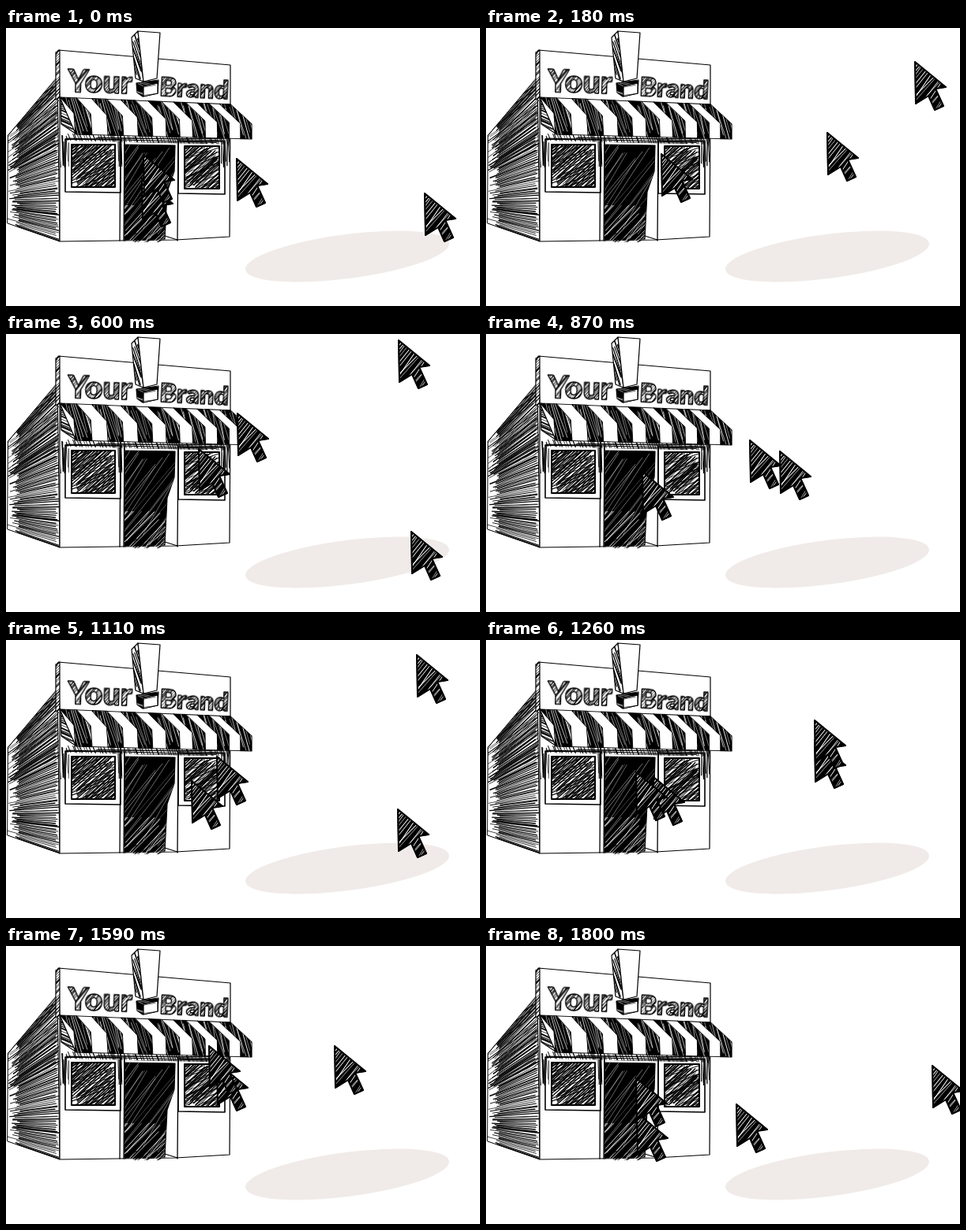
An HTML page with a canvas for the animation above (1830 ms loop, 600x353 px).

```html
<!DOCTYPE html>
<html lang="en">
<head>
<meta charset="utf-8">
<title>Storefront visitors</title>
<style>
html, body { margin: 0; width: 100%; height: 100%; overflow: hidden; background: #fff; }
canvas { display: block; }
</style>
</head>
<body>
<canvas id="stage" width="600" height="353"></canvas>
<script>
const STEP = 30, STEPS = 61, CYCLE = 62;
const stage = document.getElementById('stage').getContext('2d');
let seed = 7;
const rnd = () => (seed = (seed * 16807) % 2147483647) / 2147483647;
const jit = a => (rnd() - 0.5) * 2 * a;
const mix = (a, b, u) => a + (b - a) * u;
const box = (x, y, w, h, drop = 0) => [x, y, x + w, y + drop, x + w, y + h + drop, x, y + h];

function layer(w, h) {
  const c = document.createElement('canvas');
  c.width = w;
  c.height = h;
  const g = c.getContext('2d');
  g.lineCap = g.lineJoin = 'round';
  return g;
}

function trace(g, p) {
  g.beginPath();
  for (let i = 0; i < p.length; i += 2) g.lineTo(p[i], p[i + 1]);
}

function line(g, p, width = 1.2) {
  trace(g, p);
  g.lineWidth = width;
  g.stroke();
}

function shape(g, p, fill = '#fff', width = 1.2) {
  trace(g, p);
  g.closePath();
  g.fillStyle = fill;
  g.fill();
  g.lineWidth = width;
  g.stroke();
}

// Uneven pen strokes at one angle, kept inside a polygon
function hatch(g, p, angle, gap, width, color = '#000') {
  const xs = p.filter((v, i) => i % 2 === 0), ys = p.filter((v, i) => i % 2);
  const x0 = Math.min(...xs), x1 = Math.max(...xs), y0 = Math.min(...ys), y1 = Math.max(...ys);
  const r = Math.hypot(x1 - x0, y1 - y0) / 2;
  g.save();
  trace(g, p);
  g.clip();
  g.translate((x0 + x1) / 2, (y0 + y1) / 2);
  g.rotate(angle);
  g.strokeStyle = color;
  for (let y = -r; y < r; y += gap) {
    const a = rnd() * r / 2, b = rnd() * r / 2;
    line(g, [a - r, y + jit(gap), r - b, y + jit(gap)], width * (0.6 + rnd() * 0.8));
  }
  g.restore();
}

function shaded(g, p, fill, angle, gap, width, color) {
  shape(g, p, fill);
  hatch(g, p, angle, gap, width, color);
}

function sideWall(g) {
  shape(g, [2, 137, 65, 62, 68, 271, 2, 248], '#fff', 1);
  for (let u = 0; u <= 1; u += 0.012) {
    const a = rnd() * 0.25, b = 1 - rnd() * 0.08;
    const ya = mix(137, 248, u), yb = mix(62, 271, u);
    line(g, [mix(2, 67, a), mix(ya, yb, a), mix(2, 67, b), mix(ya, yb, b) + jit(1)], 0.7 + rnd() * 0.8);
  }
  hatch(g, [2, 137, 65, 62, 67, 150, 2, 180], -0.6, 3.2, 0.8);
}

// Hollow sketched lettering with hatching inside
function word(g, text, x, y, size, tilt) {
  const t = layer(130, 60);
  t.font = `900 ${size}px Lato, sans-serif`;
  t.fillStyle = '#fff';
  t.fillText(text, 3, 45);
  t.globalCompositeOperation = 'source-atop';
  hatch(t, box(0, 0, 130, 60), -0.9, 1.6, 0.9);
  t.globalCompositeOperation = 'source-over';
  t.lineWidth = 1.4;
  t.strokeText(text, 3, 45);
  g.save();
  g.translate(x, y);
  g.rotate(tilt);
  g.drawImage(t.canvas, -3, -45);
  g.restore();
}

function sign(g) {
  shape(g, [66, 28, 284, 47, 284, 97, 68, 89]);
  shaded(g, box(63, 31, 5, 60, -3), '#fff', -0.8, 2, 0.9);
  word(g, 'Your', 78, 81, 39, 0.03);
  word(g, 'Brand', 194, 86, 32.5, 0.05);
  shaded(g, [167, 4, 159, 12, 164, 64, 174, 68], '#fff', 1.25, 1.7, 1.1);
  shape(g, [167, 4, 195, 6, 191, 64, 174, 68]);
  shaded(g, [165, 70, 193, 66, 192, 83, 173, 87, 166, 82], '#000', 0.3, 5, 0.5, '#fff');
  shaded(g, box(174, 74, 18, 13, -4), '#fff', -0.3, 5, 0.6);
}

function awning(g) {
  shaded(g, [69, 90, 88, 134, 70, 122], '#fff', 0.4, 1.8, 1);
  const edge = (x0, x1, y0, y1) => u => [mix(x0, x1, u), mix(y0, y1, u)];
  const top = edge(69, 284, 88, 97), knee = edge(86, 311, 108, 122), hem = edge(88, 311, 135, 141);
  const recede = a => 1.25 * a / (1 + 0.25 * a);
  for (let i = 0; i < 13; i++) {
    const a = recede(i / 13), b = recede((i + 1) / 13);
    const p = [...top(a), ...top(b), ...knee(b), ...hem(b), ...hem(a), ...knee(a)];
    if (i % 2) shape(g, p, '#fff', 0.9);
    else shaded(g, p, '#000', 1.3, 3.2, 0.6, '#fff');
  }
}

function windowPane(g, x, y, w) {
  const glass = box(x + 8, y + 7, w - 15, 54);
  shape(g, box(x, y, w, 67, 1), '#fff', 1.6);
  shape(g, glass, '#fff', 2);
  hatch(g, glass, -0.75, 1.6, 1.2);
  hatch(g, glass, -0.4, 3, 0.9);
}

function front(g) {
  shape(g, [68, 89, 284, 97, 283, 265, 215, 269, 68, 271]);
  windowPane(g, 75, 141, 70);
  windowPane(g, 218, 143, 59);
  for (const x of [69, 140, 272]) hatch(g, box(x, 136, 11, 41), 1.54, 1.8, 1);

  const door = [150, 148, 214, 149, 213, 182, 204, 208, 201, 268, 150, 269];
  shape(g, door, '#000');
  hatch(g, door, -0.95, 5, 0.45, '#ccc');
  hatch(g, box(150, 225, 51, 45), -0.8, 4, 0.7, '#fff');
  hatch(g, box(150, 260, 48, 12), -0.5, 3, 0.8);
  for (const x of [144, 149, 217]) line(g, [x + 1, 142, x, 270], 1.3);
  line(g, [201, 264, 217, 269]);
  const shade = box(76, 134, 207, 9, 5);
  hatch(g, shade, 0.02, 2, 1.1);
  hatch(g, shade, 1.2, 3, 0.8);
}

function drawScene() {
  const g = layer(600, 353);
  g.fillStyle = '#fff';
  g.fillRect(0, 0, 600, 353);
  // flat disc on the ground
  g.fillStyle = '#f0ebe8';
  g.beginPath();
  g.ellipse(432, 290, 130, 28, -0.13, 0, 7);
  g.fill();
  sideWall(g);
  front(g);
  sign(g);
  awning(g);
  return g.canvas;
}

function drawArrow() {
  const g = layer(48, 68);
  g.translate(2, 2);
  const p = [0, 0, 39, 32, 26, 34, 36, 56, 25, 61, 17, 43, 1, 53];
  shape(g, p, '#000', 1.6);
  hatch(g, p, -0.9, 3.6, 0.8, '#fff');
  trace(g, p);
  g.closePath();
  g.lineWidth = 2;
  g.stroke();
  return g.canvas;
}

// Arrows bounce every 12 steps toward the door, losing height each time.
// Each lane: steps at which its arrows pass age 0, x by age, bounce heights, bounce offset.
const BOUNCE = 12, GONE = 27;
const lanes = [
  { times: [1, 20, 36, 47], x: t => 513 - 17 * t + 0.15 * t * t, heights: [144, 108, 72, 36], offset: 12 },
  { times: [8, 20, 38], x: t => 11 + 486 * Math.exp(-t / 22), heights: [240, 120, 50], offset: 6 }
];
const ground = x => 206 + 0.00017 * x * x;

function place(lane, age) {
  const x = lane.x(age), hop = (age + lane.offset) / BOUNCE;
  const i = Math.floor(hop), u = hop - i;
  return [x, ground(x) - lane.heights[i] * 4 * u * (1 - u)];
}

const scene = drawScene(), arrow = drawArrow();
const start = performance.now();

function draw(now) {
  const n = Math.floor(Math.max(0, now - start) / STEP) % STEPS;
  stage.drawImage(scene, 0, 0);
  for (const lane of lanes) {
    for (const time of lane.times) {
      const age = (n - time + BOUNCE / 2 + CYCLE) % CYCLE - BOUNCE / 2;
      if (age > GONE) continue;
      const [x, y] = place(lane, age);
      stage.drawImage(arrow, Math.round(x) - 2, Math.round(y) - 2);
    }
  }
  requestAnimationFrame(draw);
}
draw(start);
</script>
</body>
</html>
```
